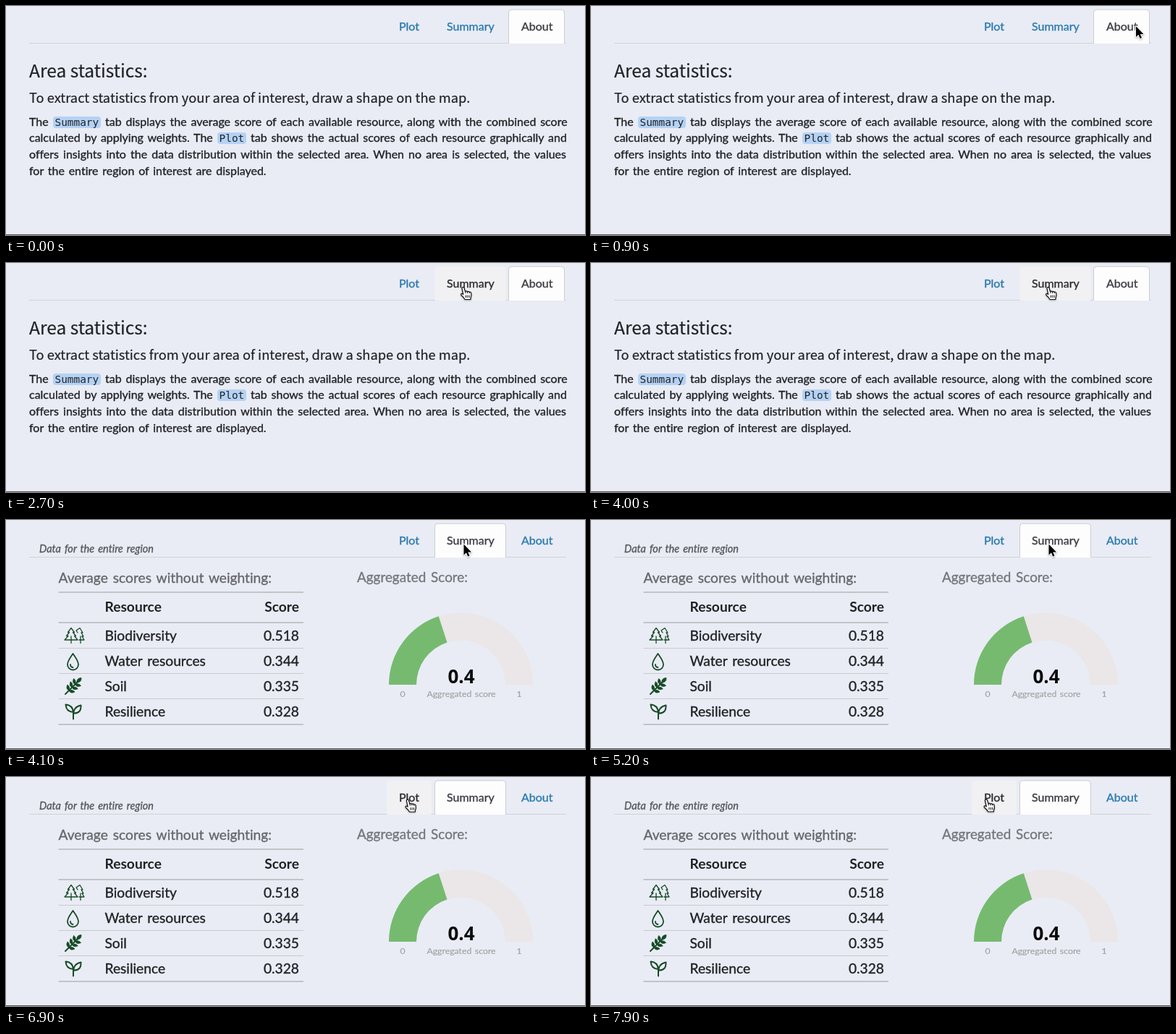
An HTML page that plays this animation: 800 by 317 pixels, repeating every 8 s.

```html
<!DOCTYPE html>
<html lang="en">
<head>
<meta charset="utf-8">
<title>Area statistics</title>
<style>
  html, body { margin: 0; width: 100%; height: 100%; overflow: hidden; background: #e9ecf4; }
  #stage { position: relative; width: 800px; height: 317px; overflow: hidden; background: #e9ecf4;
    font: 16px Lato, "Open Sans", sans-serif; font-variant-ligatures: none; color: #212226; }
  svg { position: absolute; left: 0; top: 0; display: block; }
  text { font-family: Lato, "Open Sans", sans-serif; word-spacing: .108em;
    fill: currentColor; stroke: currentColor; stroke-width: .35; }
  .head { font-family: "Noto Sans CJK JP", "Noto Sans CJK SC", "Noto Sans CJK", "Open Sans", sans-serif;
    word-spacing: 0; stroke-width: .2; }
  #body { position: absolute; left: 32px; top: 148.7px; width: 742px; line-height: 22.7px;
    word-spacing: .108em; -webkit-text-stroke: .35px currentColor; }
  #body div { height: 22.7px; white-space: nowrap; text-align: justify; text-align-last: justify; }
  #body div:last-child { text-align-last: left; }
  code { font: 14.4px/1 "DejaVu Sans Mono", monospace; background: #b4d2f5; border-radius: 4px;
    padding: 0 3px; -webkit-text-stroke: 0; }
  .tab path { fill: none; }
  .tab text { color: #2a7ab0; font-size: 16px; }
  .tab.hover path { fill: #f1f1f3; }
  .tab.hover text { color: #2b2c30; }
  .tab.active path { fill: #fdfdfe; stroke: #cbccd1; }
  .tab.active text { color: #3b3c41; }
  .row text { font-size: 19.2px; }
  .bold text { font-weight: 700; stroke: none; }
  .end { text-anchor: end; }
  .mid { text-anchor: middle; }
  .small text { font-size: 12.3px; color: #a2a3a7; stroke-width: .2; }
  .icon { fill: none; stroke: #174a27; stroke-width: 1.8; stroke-linecap: round; stroke-linejoin: round; }
</style>
</head>
<body>
<div id="stage">
  <svg width="800" height="317" viewBox="0 0 800 317">
    <path d="M32 51.5H774" stroke="#d0d2d7"/>
    <path d="M0 316.5H800" stroke="#56575b"/>
    <g id="tabs"></g>

    <g class="about">
      <text class="head" x="32" y="98.5" font-size="24.55">Area statistics:</text>
      <text class="head" x="32" y="133.5" font-size="18.3">To extract statistics from your area of interest, draw a shape on the map.</text>
    </g>

    <g class="summary">
      <text x="46" y="45" font-size="14.5" font-style="italic" color="#58595e">Data for the entire region</text>
      <text x="72.5" y="87" font-size="19.2" color="#66676b">Average scores without weighting:</text>
      <text x="485" y="86" font-size="18.9" color="#76777c">Aggregated Score:</text>
      <path d="M72.5 100H411M72.5 142H411M72.5 283H411" stroke="#c3c4c9" stroke-width="2"/>
      <path d="M72.5 177.5H411M72.5 212.5H411M72.5 247.5H411" stroke="#c9cacf"/>
      <g id="table"></g>

      <g class="icon">
        <g stroke-width="1.3">
          <path d="M90 149.5L85.5 155.5H87.5L83.5 160.5H86L81 166H99L94.5 160.5H96.5L92.5 155.5H94.5ZM90 161V170.5"/>
          <path d="M97 153L102 149.5L106 156H104L107 161H105L108 166H101M103 161V170.5M97 153L99 156"/>
        </g>
        <path d="M92.5 185C89 190 85 195 85 200A7.5 7.5 0 0 0 100 200C100 195 96 190 92.5 185ZM89 200A4 4 0 0 0 92.5 204"/>
        <g fill="#174a27" stroke-width=".8">
          <path d="M82 241L99 224" stroke-width="2"/>
          <path d="M98 225Q97 219 104 218.5Q104.500 225 98 225Z"/>
          <g id="grains"></g>
        </g>
        <path d="M93 275.500V266M93 266Q92 256 82.500 255.500Q83 265.500 93 266M93 270Q93 258.500 103.500 256.500Q104 267.500 94.500 267.500" stroke-width="2"/>
      </g>

      <path id="gaugeRest" fill="#ebe6e7"/>
      <path id="gaugeValue" fill="#76ba70"/>
      <text class="mid" x="629" y="226" font-size="26" font-weight="700" color="#0a0a0b"
        style="font-family:'Open Sans',sans-serif;stroke:none">0.4</text>
      <g class="small">
        <text class="mid" x="548" y="245">0</text>
        <text class="mid" x="629" y="245">Aggregated score</text>
        <text class="mid" x="709" y="245">1</text>
      </g>
    </g>
  </svg>

  <div id="body" class="about">
    <div>The <code>Summary</code> tab displays the average score of each available resource, along with the combined score</div>
    <div>calculated by applying weights. The <code>Plot</code> tab shows the actual scores of each resource graphically and</div>
    <div>offers insights into the data distribution within the selected area. When no area is selected, the values</div>
    <div>for the entire region of interest are displayed.</div>
  </div>

  <svg width="800" height="317" viewBox="0 0 800 317">
    <g id="cursor" style="filter:drop-shadow(0 1px 1px rgba(0,0,0,.3))">
      <path id="arrow" d="M0 0V15L3.400 11.800L5.700 17L8 16L5.800 11H10.600Z"
        stroke="#fff" stroke-width="2" stroke-linejoin="round" style="paint-order:stroke"/>
      <g id="hand" transform="translate(-1 0)" fill="#fff" stroke="#111" stroke-width="1.200" stroke-linejoin="round">
        <path d="M-1.600 1.200Q0 -1.200 1.500 1L3 6Q4.600 4.800 5.800 6.300Q7.500 5.200 8.600 6.800Q10.600 6 11.200 8Q12 12 10.600 14.500L10.400 17H2.600Q1 14 -2.600 11Q-3.500 8.600 -1.200 9L.3 10Z"/>
        <path d="M3 6L3.500 8.500M5.800 6.300L6.200 8.500M8.600 6.800L8.900 8.700M4 11V14.500M6.300 11V14.500M8.600 11V14.500" stroke-width="1"/>
      </g>
    </g>
  </svg>
</div>

<script>
const $ = id => document.getElementById(id);
const LOOP = 8000, STEP = 100, SWITCH = 4100;

// name, left edge, right edge, text x
const tabs = [
  ['Plot', 526, 588, 543],
  ['Summary', 592.5, 690.5, 609],
  ['About', 694.5, 771.5, 712]
];
$('tabs').innerHTML = tabs.map(([name, l, r, x]) =>
  `<g class="tab"><path d="M${l} 51V9a4 4 0 0 1 4-4H${r - 4}a4 4 0 0 1 4 4V51"/>` +
  `<path d="M${l + .5} 51H${r - .5}V52H${l + .5}Z" style="stroke:none"/>` +
  `<text x="${x}" y="34">${name}</text></g>`).join('');
const tabNodes = [...document.querySelectorAll('.tab')];

const rows = [
  ['Resource', 'Score', 127], ['Biodiversity', '0.518', 167], ['Water resources', '0.344', 202],
  ['Soil', '0.335', 237], ['Resilience', '0.328', 272]
];
$('table').innerHTML = rows.map(([name, score, y], i) =>
  `<g class="row${i ? '' : ' bold'}"><text x="136.5" y="${y}">${name}</text>` +
  `<text class="end" x="405" y="${y}">${score}</text></g>`).join('');

// Paired wheat grains along the stalk
$('grains').innerHTML = [0, 1, 2].map(i => {
  const x = 87 + i * 4.3, y = 236 - i * 4.3;
  return `<path d="M${x} ${y}q-5 -2 -2 -8q4 3 2 8ZM${x} ${y}q2 5 8 2q-3 -4 -8 -2Z"/>`;
}).join('');

function ring(from, to) {
  const at = (r, f) => {
    const a = Math.PI * (1 + f);
    return `${628.5 + r * Math.cos(a)} ${228 + r * Math.sin(a)}`;
  };
  return `M${at(99.5, from)}A99.5 99.5 0 0 1 ${at(99.5, to)}L${at(61.5, to)}A61.5 61.5 0 0 0 ${at(61.5, from)}Z`;
}
$('gaugeRest').setAttribute('d', ring(.4, 1));
$('gaugeValue').setAttribute('d', ring(0, .4));

// Cursor hot spot: time, x, y
const route = [
  [200, 748, -24], [700, 753, 28], [1500, 753, 28], [1800, 742, 29], [2000, 691, 33],
  [2400, 632.5, 33.5], [6500, 632.5, 33.5], [7000, 547, 31]
];
function cursorAt(t) {
  const i = route.findIndex(p => p[0] > t);
  if (i === 0) return route[0].slice(1);
  if (i < 0) return route[route.length - 1].slice(1);
  const [t0, x0, y0] = route[i - 1], [t1, x1, y1] = route[i];
  const k = (t - t0) / (t1 - t0), e = k * k * (3 - 2 * k);
  return [x0 + (x1 - x0) * e, y0 + (y1 - y0) * e];
}

const show = (node, on) => { node.style.display = on ? '' : 'none'; };
const views = ['about', 'summary'].map(c => [...document.querySelectorAll('.' + c)]);

function draw(now) {
  const t = Math.floor(now % LOOP / STEP) * STEP;
  const summary = t >= SWITCH, active = summary ? 1 : 2;
  const [x, y] = cursorAt(t);
  const over = tabs.findIndex(([, l, r]) => x > l && x < r && y > 5 && y < 51);

  tabNodes.forEach((node, i) => {
    const state = i === active ? ' active' : i === over ? ' hover' : '';
    node.setAttribute('class', 'tab' + state);
  });
  views.forEach((nodes, i) => nodes.forEach(n => show(n, i === +summary)));

  const link = over >= 0 && over !== active;
  show($('hand'), link);
  show($('arrow'), !link);
  $('cursor').setAttribute('transform', `translate(${x} ${y})`);
}

let start;
function tick(now) {
  start ??= now;
  draw(now - start);
  requestAnimationFrame(tick);
}
draw(0);
requestAnimationFrame(tick);
</script>
</body>
</html>
```
